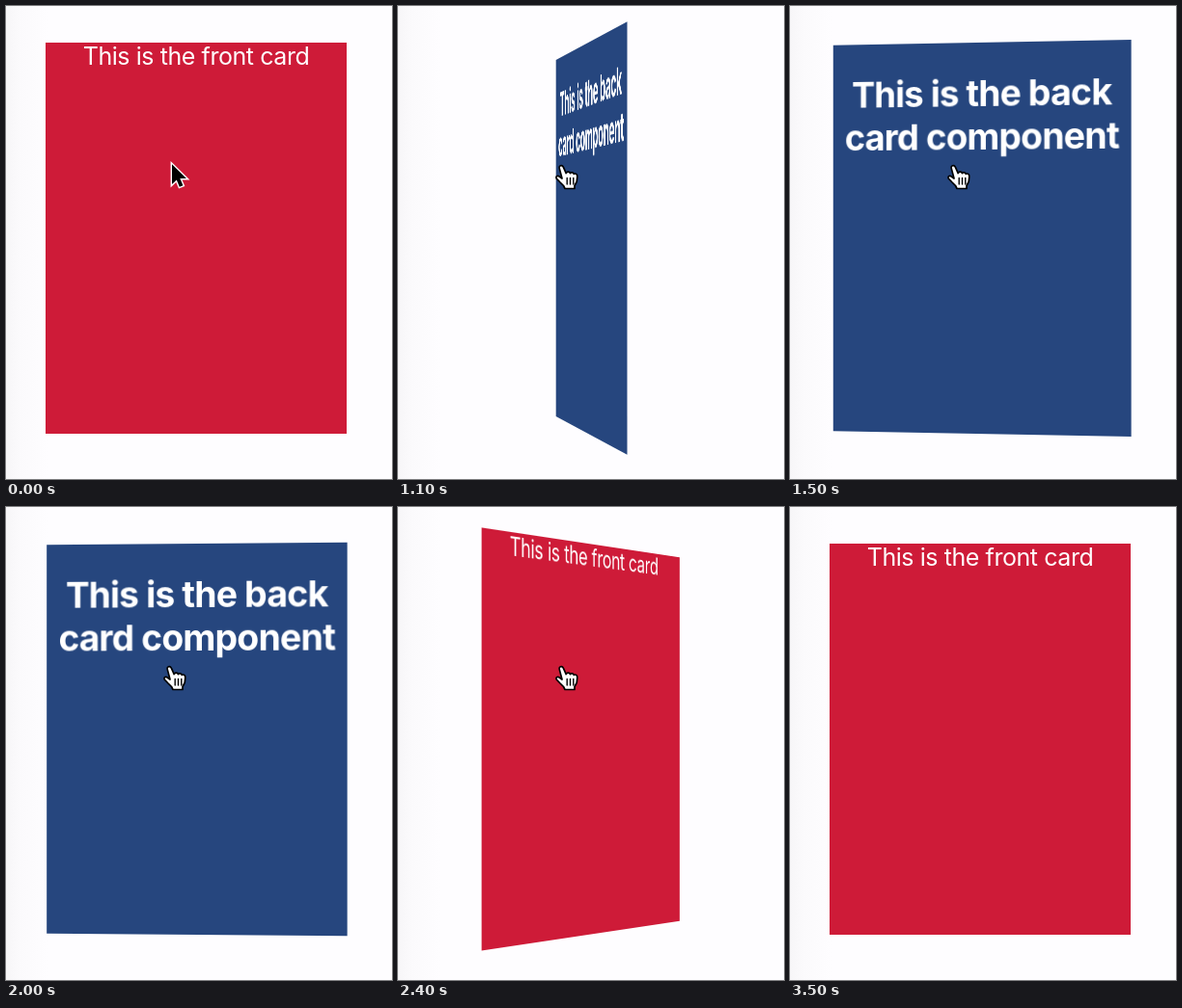
An HTML page for the animation above (3.6 s loop, 400 px wide and 491 px high).

```html
<!DOCTYPE html>
<html lang="en">
<head>
<meta charset="utf-8">
<title>Flip card</title>
<style>
  html, body { margin: 0; width: 100%; height: 100%; overflow: hidden; }
  body {
    position: relative;
    background: linear-gradient(90deg, #f7f6f8 0, #fbfafc 14px, #fefdff 44px);
  }
  #scene {
    position: absolute; left: 41px; top: 38px; width: 312px; height: 406px;
    perspective: 1560px;
  }
  .face {
    position: absolute; inset: 0;
    color: #fff; text-align: center;
    font: 24.96px/1.1934 Inter, "Open Sans", sans-serif;
    font-optical-sizing: none;
    letter-spacing: -.0165em;
  }
  #front { background: #ce1b38; }
  #back { background: #26467e; }
  h2 {
    margin: .83em 0; font-size: 1.5em; font-weight: 700;
    letter-spacing: -.023em;
  }
  svg { position: absolute; left: 0; top: 0; }
</style>
</head>
<body>
<div id="scene">
  <div class="face" id="front">This is the front card</div>
  <div class="face" id="back"><h2>This is the back<br>card component</h2></div>
</div>
<svg width="400" height="491" viewBox="0 0 400 491">
  <path id="arrow" transform="translate(172 164.3) scale(1.3)" fill="#000" stroke="#fff"
    stroke-width="2.2" paint-order="stroke"
    d="M0 0V16L3.7 12.4 6 18 8.8 16.8 6.4 11.3H11.5Z"/>
  <g id="hand" stroke="#000" stroke-width="1.7" stroke-linejoin="round" stroke-linecap="round">
    <path fill="#fff" d="M167.2 168.4C166.4 165.4 170.2 164.6 171.3 167.2L174.2 173.6
      C175 171.6 177.8 171.8 178.5 173.6C179.4 172.2 181.8 172.6 182.3 174.4
      C183.8 173.4 185.9 174.4 185.8 177L185.2 182.5 183 186.5V189.5H173L171.5 186.5
      167.5 182.5 164.2 179C163.2 177 165.2 175.8 166.8 176.8L170 179Z"/>
    <path fill="none" stroke-width="1.4" d="M175.2 178.5V185M178.5 178.5V185M181.8 178.5V185"/>
  </g>
</svg>
<script>
  const LOOP = 3600, STEP = 100, FLIP = 1000;
  const OPEN = 767, CLOSE = 1967, HOVER = 300, LEAVE = 3200;
  const [front, back, arrow, hand] =
    ["front", "back", "arrow", "hand"].map(id => document.getElementById(id));

  // cubic-bezier(.25, .1, .25, 1)
  function ease(x) {
    if (x <= 0) return 0;
    if (x >= 1) return 1;
    let lo = 0, hi = 1;
    for (let i = 0; i < 30; i++) {
      const s = (lo + hi) / 2;
      if (.75 * s - .75 * s * s + s ** 3 < x) lo = s; else hi = s;
    }
    return .3 * lo + 2.4 * lo * lo - 1.7 * lo ** 3;
  }

  const show = (el, on) => { el.style.visibility = on ? "visible" : "hidden"; };

  function draw(t) {
    const angle = 180 * (ease((t - OPEN) / FLIP) - ease((t - CLOSE) / FLIP));
    front.style.transform = `rotateY(${angle}deg)`;
    back.style.transform = `rotateY(${angle - 180}deg)`;
    show(front, angle < 90);
    show(back, angle >= 90);
    show(arrow, t < HOVER);
    show(hand, t >= HOVER && t < LEAVE);
  }

  const start = performance.now();
  function tick() {
    const t = (performance.now() - start) % LOOP;
    draw(Math.floor(t / STEP) * STEP);
    requestAnimationFrame(tick);
  }
  draw(0);
  requestAnimationFrame(tick);
</script>
</body>
</html>
```
